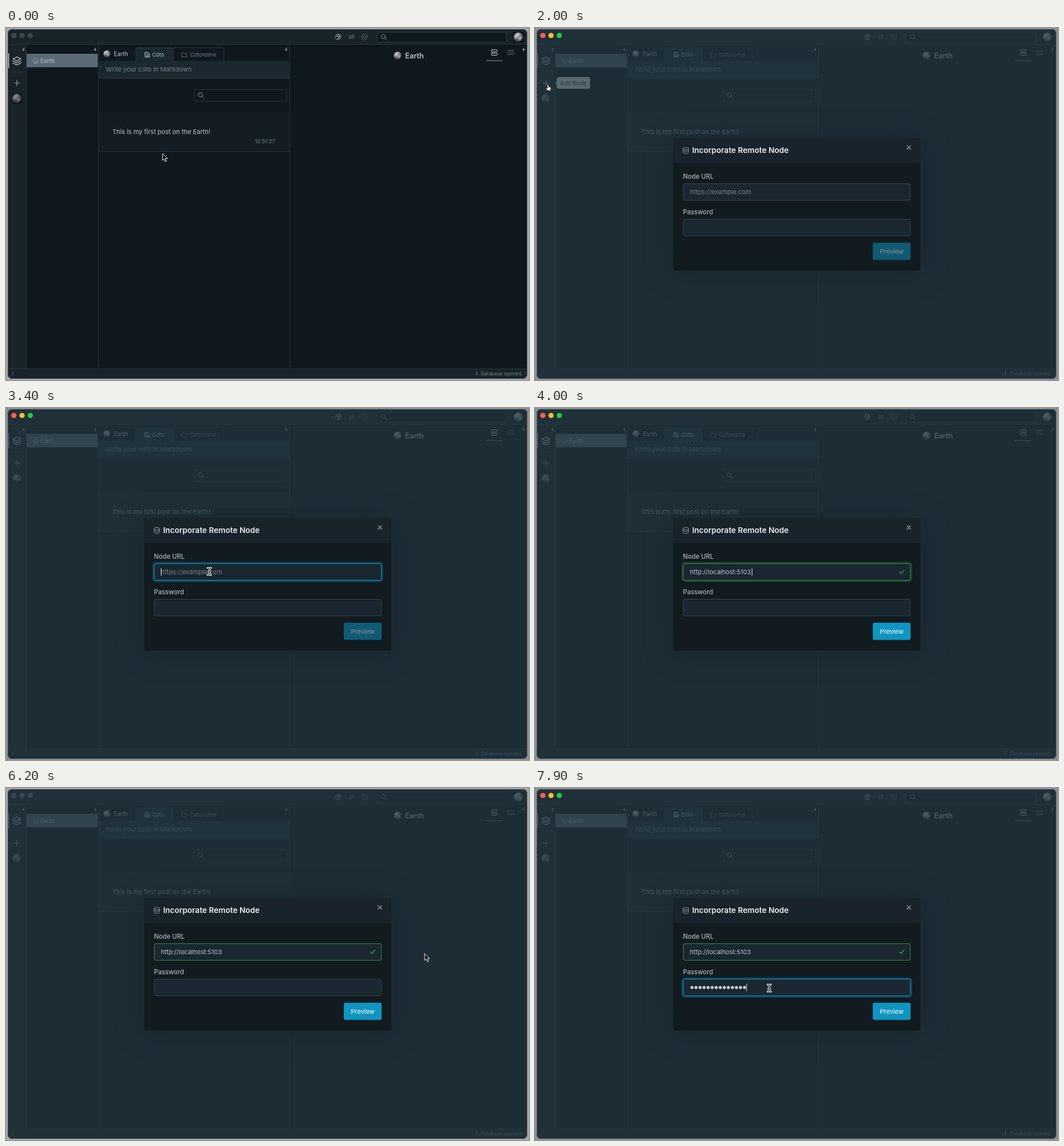
These frames come from a looping animation (912 by 614 pixels, 8000 ms). An HTML page:

```html
<!DOCTYPE html>
<html lang="en">
<head>
<meta charset="utf-8">
<title>Incorporate Remote Node</title>
<style>
  html, body { margin: 0; width: 100%; height: 100%; overflow: hidden; background: #a6a8aa; }
  svg { display: block; font: 11px Inter, sans-serif; }
  text { fill: #bbc6ce; }
  .muted, .muted text { fill: #73828c; }
  .line { fill: none; stroke: #27343c; }
  .icon { fill: none; stroke: #8b98a1; stroke-linejoin: round; stroke-linecap: round; }
  .dim { stroke: #56646d; }
  .bright { stroke: #d5dce1; }
  .field { fill: #1a2730; stroke: #344751; }
  .tab { font-size: 9.2px; }
  .label { font-size: 11.2px; font-weight: 500; fill: #aab5bd; }
</style>
</head>
<body>
<svg width="912" height="614" viewBox="0 0 912 614">
  <defs>
    <radialGradient id="globe" cx=".4" cy=".35" r=".7">
      <stop offset="0" stop-color="#aeb3ba"/><stop offset=".55" stop-color="#70757e"/><stop offset="1" stop-color="#22262d"/>
    </radialGradient>
    <g id="planet">
      <circle r="7" fill="url(#globe)"/>
      <path d="M-5-2Q-2-7 2-5Q1-2-2-2Q-3 2-5 1Z" fill="#d0d4d8" opacity=".75"/>
      <path d="M0 1Q3-2 5 0Q5 4 1 5Q2 3 0 1Z" fill="#c6cad0" opacity=".55"/>
      <path d="M-4 3Q-1 2 0 5L-2 6Z" fill="#373d47" opacity=".7"/>
    </g>
    <g id="lens" class="icon"><circle cx="-1" cy="-1" r="3.6"/><path d="M1.7 1.7L5 5"/></g>
    <path id="fold" d="M2-3.5V3.5L-2 0Z" fill="#71808a"/>
    <clipPath id="frame"><rect x="3" y="2" width="906" height="610" rx="8"/></clipPath>
  </defs>

  <rect id="desktop" width="912" height="614"/>
  <g clip-path="url(#frame)">
    <rect width="912" height="614" fill="#0f181f"/>
    <path d="M0 0H912V28H0ZM0 28H36V595H0ZM0 595H912V614H0Z" fill="#18232a"/>
    <path d="M162 57.500H494V87H162Z" fill="#1a2930"/>
    <path d="M162 146H494V215H162Z" fill="#131d23"/>
    <path class="line" d="M3 28.500H909M3 594.500H909M35.500 28V594M161.500 28V594M494.500 28V594M162 87.500H494M162 215.500H494M9 76.500H29"/>

    <!-- title bar -->
    <g class="icon dim">
      <g stroke="#8b98a1"><circle cx="579" cy="15.500" r="4.800"/><path d="M576 12L578 15L581 16L579 19M580 11L582 14L584 15" stroke-width="1.500"/></g>
      <path d="M598 14H607L604.500 11.500M607 17H598L600.500 19.500" stroke="#7b8992"/>
      <circle cx="625" cy="15.500" r="2.300"/>
      <circle cx="625" cy="15.500" r="5" stroke-dasharray="1.200 2.727" stroke-width="1.500"/>
    </g>
    <rect x="647.500" y="7.500" width="225" height="17" rx="2" fill="#0f181f" stroke="#2b3942"/>
    <use href="#lens" x="659" y="16"/>
    <rect x="884.500" y="7" width="18" height="18" rx="3" fill="#05080b"/>
    <use href="#planet" transform="translate(893.500 16) scale(1.200)"/>

    <!-- node strip -->
    <path d="M4.500 44V70" stroke="#d5dce1" stroke-width="1.500"/>
    <g class="icon bright" stroke-width="1.300"><path d="M19 50.500L26 54L19 57.500L12 54ZM12 57.500L19 61L26 57.500M12 61L19 64.500L26 61"/></g>
    <path id="plus" class="icon" d="M14 96H24M19 91V101" stroke-width="1.200"/>
    <rect x="10" y="114" width="18" height="18" rx="3" fill="#0b1116"/>
    <use href="#planet" transform="translate(19 123) scale(1.200)" opacity=".65"/>
    <use href="#fold" x="30" y="37.500"/><use href="#fold" x="155" y="37.500"/>
    <use href="#fold" x="488" y="37.500"/><use href="#fold" x="902" y="37.500"/>

    <!-- cotonoma list -->
    <rect x="36" y="45" width="124" height="23.500" fill="#5a6b77"/>
    <path class="icon" stroke="#c3ced6" d="M47 57L51.500 52.500L56 57M48.300 56V61.500H54.700V56M50.500 61.500V58.500H52.500V61.500"/>
    <text x="60" y="60.700" font-size="10">Earth</text>

    <!-- timeline -->
    <use href="#planet" transform="translate(176 45) scale(.9)"/>
    <text x="188" y="48.700" font-size="10">Earth</text>
    <path d="M226.500 57.500V37Q226.500 34.500 229 34.500H288.500Q291 34.500 291 37V57.500" fill="#1a2930" stroke="#2b3b44"/>
    <path class="line" d="M291.500 57V37Q291.500 34.500 294 34.500H377.500Q380 34.500 380 37V57"/>
    <path class="icon bright" d="M243 42.500H247.500L250 45V50.500H243ZM245 46H248M245 48.300H248"/>
    <text class="tab" x="255" y="49.700">Coto</text>
    <path class="icon dim" d="M307 43H310L311.500 44.500H315.500V50.500H307Z"/>
    <text class="tab muted" x="321" y="49.700">Cotonoma</text>
    <text class="muted" x="174" y="76.300">Write your coto in Markdown</text>
    <rect x="328.500" y="107.500" width="161" height="20.500" rx="2" fill="#0f181f" stroke="#2b3942"/>
    <use href="#lens" x="340" y="117.500"/>
    <text x="185.500" y="185">This is my first post on the Earth!</text>
    <text class="muted" x="434" y="200.600" font-size="9.400">12:51:27</text>

    <!-- stock -->
    <use href="#planet" transform="translate(683 48)"/>
    <text x="696" y="52.500" font-size="12.700" font-weight="600">Earth</text>
    <g class="icon bright"><rect x="846.500" y="38" width="10" height="3.700" rx="1"/><rect x="846.500" y="43.800" width="10" height="3.700" rx="1"/><path d="M837.500 57H865.500" stroke="#8b98a1"/></g>
    <path class="icon dim" stroke="#6f7d86" d="M875.500 39H885.500V46H875.500ZM878.800 39V46M882.200 39V46"/>

    <g class="muted"><text x="10.500" y="606" font-size="9.500">/</text><text x="819.500" y="606" font-size="9.500" font-weight="600">i</text><text x="828" y="605.700" font-size="8.450">Database opened.</text></g>

    <g id="tooltip">
      <path d="M35.500 96L38.500 93V99Z" fill="#edf0f3"/>
      <rect x="38" y="85.500" width="58" height="20.500" rx="3" fill="#edf0f3"/>
      <text x="44" y="99.500" font-size="9.700" style="fill:#1b2832">Add Node</text>
    </g>

    <g id="modal">
      <rect width="912" height="614" fill="#233640" opacity=".73"/>
      <rect x="241" y="192" width="431" height="231" rx="3" fill="#111b20" style="filter:drop-shadow(0 4px 25px #0f1a2066)"/>
      <path d="M241 235.500V195Q241 192 244 192H669Q672 192 672 195V235.500Z" fill="#18232c"/>
      <g class="icon" stroke="#bbc6ce"><ellipse cx="263" cy="210.300" rx="4.700" ry="2"/><path d="M258.300 210.300V217Q263 220.500 267.700 217V210.300M258.300 213.600Q263 217 267.700 213.600"/></g>
      <text x="274" y="218.300" font-size="13.600" font-weight="600" style="fill:#edf0f3">Incorporate Remote Node</text>
      <path class="icon" d="M648.700 205.200L655 211.500M655 205.200L648.700 211.500" stroke-width="1.400"/>
      <text class="label" x="258" y="263.300">Node URL</text>
      <text class="label" x="258" y="325.300">Password</text>
      <rect id="urlRing" x="257.500" y="270.500" width="398" height="31" rx="4" fill="none" stroke-width="4"/>
      <rect id="urlField" class="field" x="258.500" y="271.500" width="396" height="29" rx="3"/>
      <text id="url" x="270" y="290"></text>
      <path id="check" class="icon" style="stroke:#3f9a45" stroke-width="1.500" d="M635.500 286L638.300 288.800L643.500 283"/>
      <rect id="passRing" x="257.500" y="332.500" width="398" height="31" rx="4" fill="none" stroke="#1095c1" stroke-width="4"/>
      <rect id="passField" class="field" x="258.500" y="333.500" width="396" height="29" rx="3"/>
      <g id="dots" fill="#c3cdd4"></g>
      <path id="caret" stroke="#d5dce1"/>
      <g id="button"><rect x="589" y="374.500" width="66" height="30" rx="3" fill="#1095c1"/><text x="601.500" y="393.600" style="fill:#fff">Preview</text></g>
    </g>
  </g>
  <rect x="3.500" y="2.500" width="905" height="609" rx="8" fill="none" stroke="#414b51"/>
  <g id="lights"><circle cx="13.700" cy="13" r="4.600"/><circle cx="28" cy="13" r="4.600"/><circle cx="42.300" cy="13" r="4.600"/></g>

  <g id="pointer">
    <path id="arrow" d="M0 0V12L2.800 9.500L4.800 14L6.800 13L4.900 8.700H8.700Z" fill="#0b0f12" stroke="#f4f6f7"/>
    <path id="hand" d="M-1 .5Q.3-.5 1.200 1L2 4.500L5.200 5.300Q6.500 6 6 8L5 11.500H0L-3 7.500Q-3.200 5.800-1.500 6.500L-.5 7.300Z" fill="#f4f6f7" stroke="#0b0f12" stroke-width=".9"/>
    <g id="beam" fill="none" stroke-linecap="round"><path id="beamShape" d="M-3-6Q0-6 0-4Q0-6 3-6M0-4V4M-3 6Q0 6 0 4Q0 6 3 6M-1.500 1H1.500" stroke="#e6eaec" stroke-width="3"/><use href="#beamShape" style="stroke:#0b0f12"/><path d="M-3-6Q0-6 0-4Q0-6 3-6M0-4V4M-3 6Q0 6 0 4Q0 6 3 6M-1.500 1H1.500" stroke="#0b0f12"/></g>
  </g>
</svg>
<script>
const LOOP = 8000, STEP = 100;
const $ = id => document.getElementById(id);
const set = (id, attrs) => Object.entries(attrs).forEach(([k, v]) => $(id).setAttribute(k, v));
const show = (id, amount) => set(id, { opacity: +amount });
const ramp = (t, from, to) => Math.min(1, Math.max(0, (t - from) / (to - from)));
const within = (t, from, to) => t >= from && t < to;

// time, x, y
const path = [
  [0, 273, 219], [50, 273, 219], [950, 22, 98], [2050, 22, 98], [3050, 340, 285],
  [6100, 741, 287], [7000, 421, 340], [7100, 421, 340], [7400, 408.500, 349], [LOOP, 408.500, 349]
];
const lightColors = ['#ff5f57', '#febc2e', '#28c840'];

for (let i = 0; i < 14; i++)
  $('dots').innerHTML += `<circle cx="${273.800 + i * 7.040}" cy="348" r="2.700"/>`;

function pointerAt(t) {
  const i = Math.max(1, path.findIndex(p => p[0] > t));
  const [t0, x0, y0] = path[i - 1], [t1, x1, y1] = path[i];
  const u = ramp(t, t0, t1), e = u * u * (3 - 2 * u);
  return [x0 + (x1 - x0) * e, y0 + (y1 - y0) * e];
}

function drawPointer(t) {
  const [x, y] = pointerAt(t);
  const shape = within(t, 900, 2100) ? 'hand' : within(t, 2800, 3600) || t >= 7200 ? 'beam' : 'arrow';
  set('pointer', { transform: `translate(${x} ${y})` });
  show('pointer', !within(t, 3600, 6200));
  ['arrow', 'hand', 'beam'].forEach(name => show(name, name === shape));
}

function drawForm(t) {
  const filled = t >= 3600;
  const valid = ramp(t, 3600, 3900);
  const urlFocus = ramp(t, 3000, 3300) * (1 - ramp(t, 4400, 4600)) + ramp(t, 7100, 7300) * (1 - ramp(t, 7300, 7500));
  const passFocus = ramp(t, 7300, 7600);
  $('url').textContent = filled ? 'http://localhost:5103' : 'https://example.com';
  $('url').style.fill = filled ? '#bbc6ce' : '#73828c';
  $('urlField').style.stroke = filled ? '#3a8a40' : urlFocus > 0 ? '#1095c1' : '#344751';
  set('urlRing', { stroke: filled ? '#388e3c' : '#1095c1', opacity: urlFocus * .35 });
  $('passField').style.stroke = passFocus > 0 ? '#1095c1' : '#344751';
  show('passRing', passFocus * .35);
  show('check', valid);
  show('button', .52 + .48 * valid);
  show('dots', t >= 7900);

  const inPassword = t >= 7400;
  const x = inPassword ? (t >= 7900 ? 369 : 270.500) : filled ? 378.500 : 270.500;
  const y = inPassword ? 341.500 : 279.500;
  set('caret', { d: `M${x} ${y}v13` });
  show('caret', within(t, 3100, 4500) || t >= 7100);
}

function draw(now) {
  const t = Math.floor(now % LOOP / STEP) * STEP;
  const active = within(t, 1000, 4500) || t >= 7100;
  set('desktop', { fill: active ? '#8c8f91' : '#a6a8aa' });
  [...$('lights').children].forEach((dot, i) => dot.setAttribute('fill', active ? lightColors[i] : '#3c464c'));
  show('tooltip', ramp(t, 1000, 1300) * (1 - ramp(t, 2000, 2200)));
  $('plus').style.stroke = within(t, 900, 2100) ? '#d5dce1' : '#8b98a1';
  show('modal', t >= 2000);
  drawForm(t);
  drawPointer(t);
  requestAnimationFrame(draw);
}
requestAnimationFrame(draw);
</script>
</body>
</html>
```
